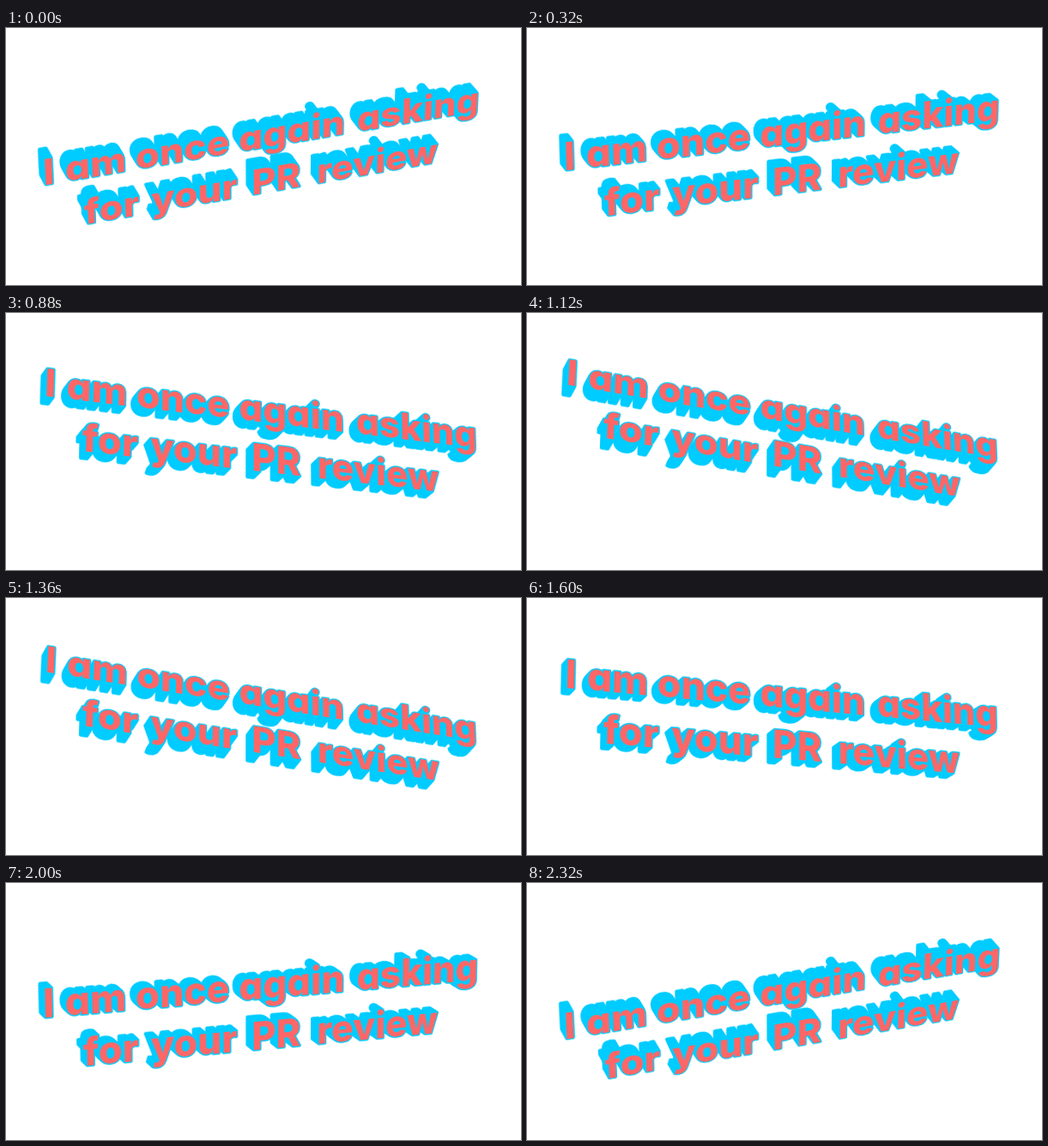
An HTML page without scripts for the animation above (2.4 s loop, 600 by 300 pixels).

```html
<!DOCTYPE html>
<html lang="en">
<head>
<meta charset="utf-8">
<title>Swaying 3D text</title>
<style>
  @property --phase {
    syntax: '<angle>';
    inherits: false;
    initial-value: 0deg;
  }

  html, body {
    margin: 0;
    width: 100%;
    height: 100%;
    overflow: hidden;
    background: #fff;
  }

  .stage {
    position: relative;
    width: 600px;
    height: 300px;
    overflow: hidden;
    perspective: 3000px;
  }

  .block {
    position: absolute;
    inset: 0;
    transform-style: preserve-3d;
    transform: rotateX(calc(-30deg * cos(var(--phase)))) rotateY(19deg);
    animation: sway 2400ms steps(30) infinite;
  }

  @keyframes sway {
    from { --phase: 0deg; }
    to { --phase: 360deg; }
  }

  /* Cyan slices stacked in depth form the extrusion */
  svg {
    position: absolute;
    inset: 0;
    overflow: visible;
    fill: #0cf;
    stroke: #0cf;
    stroke-width: 3px;
    stroke-linejoin: round;
    transform: translateZ(calc(var(--i) * 2px - 12px));
  }

  .face {
    fill: #f66;
    stroke: none;
    transform: translateZ(12.3px);
  }

  text {
    font: 800 46px Inter, Lato, sans-serif;
    font-optical-sizing: none;
    font-feature-settings: 'cv11';
    text-anchor: middle;
  }
</style>
</head>
<body>
<div class="stage">
  <div class="block">
    <svg width="600" height="300" style="--i:0">
      <g id="words" transform="translate(300 150)">
        <g transform="translate(0 -19)">
          <text x="-260">I</text>
          <text x="-205">am</text>
          <text x="-102">once</text>
          <text x="31">again</text>
          <text x="188.5">asking</text>
        </g>
        <g transform="translate(0 42.2)">
          <text x="-188">for</text>
          <text x="-88.5">your</text>
          <text x="11.5">PR</text>
          <text x="138.5">review</text>
        </g>
      </g>
    </svg>
    <svg width="600" height="300" style="--i:1"><use href="#words"/></svg>
    <svg width="600" height="300" style="--i:2"><use href="#words"/></svg>
    <svg width="600" height="300" style="--i:3"><use href="#words"/></svg>
    <svg width="600" height="300" style="--i:4"><use href="#words"/></svg>
    <svg width="600" height="300" style="--i:5"><use href="#words"/></svg>
    <svg width="600" height="300" style="--i:6"><use href="#words"/></svg>
    <svg width="600" height="300" style="--i:7"><use href="#words"/></svg>
    <svg width="600" height="300" style="--i:8"><use href="#words"/></svg>
    <svg width="600" height="300" style="--i:9"><use href="#words"/></svg>
    <svg width="600" height="300" style="--i:10"><use href="#words"/></svg>
    <svg width="600" height="300" style="--i:11"><use href="#words"/></svg>
    <svg width="600" height="300" style="--i:12"><use href="#words"/></svg>
    <svg class="face" width="600" height="300"><use href="#words"/></svg>
  </div>
</div>
</body>
</html>
```
